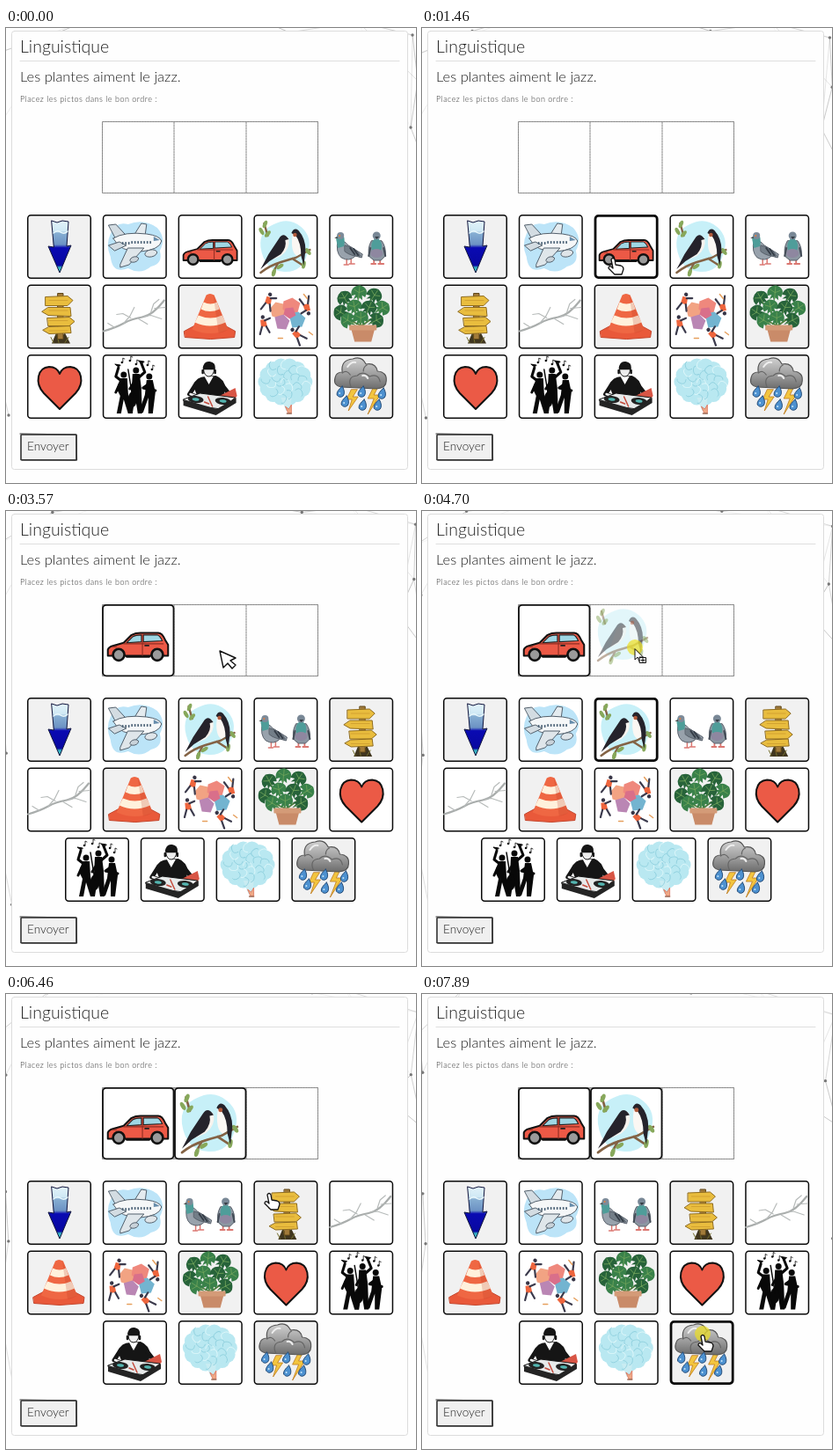
An HTML page with a canvas that plays this animation: 466 px wide and 517 px high, repeating every 8000 ms.

```html
<!DOCTYPE html>
<html lang="fr">
<head>
<meta charset="utf-8">
<title>Linguistique</title>
<style>
html, body { margin: 0; width: 100%; height: 100%; overflow: hidden; background: #fefefe; }
canvas { display: block; width: 466px; height: 517px; }
</style>
</head>
<body>
<canvas id="stage"></canvas>
<script>
const W = 466, H = 517, LOOP = 8000, TILE = 73;
const canvas = document.getElementById('stage');
const ratio = window.devicePixelRatio || 1;
canvas.width = W * ratio;
canvas.height = H * ratio;
const c = canvas.getContext('2d');

// Drawing helpers
function path(d, fill, stroke, width = 1) {
  const p = new Path2D(d);
  if (fill) { c.fillStyle = fill; c.fill(p); }
  if (stroke) { c.strokeStyle = stroke; c.lineWidth = width; c.stroke(p); }
}
function oval(x, y, rx, ry, fill, angle = 0, stroke, width = 1) {
  c.beginPath();
  c.ellipse(x, y, rx, ry, angle, 0, Math.PI * 2);
  if (fill) { c.fillStyle = fill; c.fill(); }
  if (stroke) { c.strokeStyle = stroke; c.lineWidth = width; c.stroke(); }
}
const dot = (x, y, r, fill, stroke, width) => oval(x, y, r, r, fill, 0, stroke, width);
function box(x, y, w, h, r, fill, stroke, width) {
  c.beginPath();
  c.roundRect(x, y, w, h, r);
  if (fill) { c.fillStyle = fill; c.fill(); }
  if (stroke) { c.strokeStyle = stroke; c.lineWidth = width; c.stroke(); }
}
function at(x, y, draw, angle = 0, scale = 1) {
  c.save();
  c.translate(x, y);
  c.rotate(angle);
  c.scale(scale, scale);
  draw();
  c.restore();
}
function label(text, x, y, size, color, spacing = 0) {
  c.font = `300 ${size}px Lato, sans-serif`;
  c.letterSpacing = spacing + 'px';
  c.fillStyle = color;
  c.fillText(text, x, y);
}
function shade(y0, y1, ...stops) {
  const g = c.createLinearGradient(0, y0, 0, y1);
  stops.forEach(([pos, color]) => g.addColorStop(pos, color));
  return g;
}

// Pictograms, each in a 73 x 73 box
function arrow() {
  const blue = shade(7, 66, [0, '#e2f3fa'], [.2, '#cfe8f4'], [.24, '#86aed2'],
    [.46, '#6c92c4'], [.52, '#0a0ab2'], [.86, '#0808a0'], [.9, '#38b6c4'], [1, '#38b6c4']);
  path('M28 7L34 9L40 7L47 8L45 36L50 35L37 66L24 36L30 37Z', blue, '#10143c', 1);
  path('M30 21Q34 17 38 20T46 19', null, '#eaf8fc', 1.5);
}
function plane() {
  path('M9 22Q15 7 29 11Q47 4 62 15Q73 27 65 41Q69 56 55 59Q43 69 29 61Q11 68 9 48Q3 34 9 22', '#bce4f8');
  const ink = '#53606c';
  path('M34 26L44 10L50 11L48 26Z', '#e4ebef', ink);
  path('M7 12L15 11L27 24L17 31Z', '#d3dce2', ink);
  path('M12 27Q25 19 50 22Q65 24 67 30Q65 40 43 42Q20 43 12 27', '#f5f7f8', ink);
  path('M7 35L19 31L27 35L14 41Z', '#d3dce2', ink);
  path('M29 38L47 38L30 57L20 60L20 57Z', '#dfe6ea', ink);
  oval(55, 44, 7, 4, '#dfe5e9', -.2, ink);
  oval(36, 51, 5, 3, '#c9d3da', -.3, ink);
  for (let i = 0; i < 10; i++) box(22 + i * 3.5, 30 + (i < 3 ? 1 : 0), 1.7, 3, .5, '#51677b');
  path('M58 25L65 29L58 30Z', '#668cab');
}
function car() {
  path('M6 51V46Q7 43 11 42L22 39L30 31Q34 29 39 29H57Q61 29 64 36L67 41V52H6Z', '#ec5946', '#111', 1.8);
  path('M25 39L31 33Q34 31 40 31V38Z', '#9fd7e4', '#222');
  path('M42 31H56Q59 32 61 37L42 38Z', '#9fd7e4', '#222');
  path('M41 31V52M22 40H62M11 43H15', null, '#8f2c22', 1);
  box(43, 41, 5, 1.6, .5, '#222');
  for (const x of [17, 56]) dot(x, 51, 5.8, '#9a9a9a', '#111', 2.4);
  path('M25 53H48', null, '#111', 2);
}
function swallows() {
  path('M8 37Q6 18 23 11Q40 2 54 14Q68 26 61 45Q55 66 35 65Q12 64 8 37', '#c7f0f8');
  path('M8 66Q18 58 31 54T48 49L64 40M16 24L12 10M28 55L22 66M44 50L55 57', null, '#846345', 2.4);
  for (const [x, y, a] of [[13, 11, .4], [9, 19, -.5], [16, 22, .7], [23, 66, .3], [30, 59, 1], [57, 57, .2], [62, 42, -.6]])
    oval(x, y, 2.2, 4.5, '#87a85b', a);
  path('M29 30Q38 21 40 28Q42 39 31 47L22 51Z', '#f7f3ee');
  path('M40 28Q34 19 29 27L17 45L8 62L18 53L31 45Q38 37 36 29Z', '#25232b');
  path('M44 25Q44 17 49 17Q54 20 55 29L54 44L49 47Q42 42 44 25', '#fbf7f3');
  path('M43 21Q46 14 51 18Q59 27 59 40L57 58L54 47Q54 32 48 24Z', '#25232b');
  dot(47, 23, 2.2, '#b15a3b');
}
function pigeons() {
  const ink = '#59616b';
  path('M20 49V56M25 49V55M17 57H22M23 56H29', null, '#db7771', 1.5);
  path('M10 29Q16 28 22 35L38 45L37 49L30 47Q23 54 14 49Q7 43 10 29', '#98a2ac', ink);
  path('M18 35Q30 37 36 47Q25 48 18 42Z', '#737e88', ink);
  path('M24 38L29 45M28 39L33 46', null, '#353d47', 2);
  path('M8 28Q9 20 14 21Q19 24 17 36L10 38Z', '#4e9d99');
  dot(13, 24, 4, '#7d8b99');
  dot(12, 24, 1, '#e57e3d');
  path('M9 25L6 27L10 27Z', '#444');
  path('M51 49V55M58 49V55M48 56H53M56 56H62', null, '#db7771', 1.8);
  path('M48 30Q43 39 46 48L51 52H59L64 47Q65 37 60 30Z', '#8c97a2', ink);
  oval(54, 36, 6, 9, '#4f9d9a');
  oval(54, 44, 7, 5, '#8e87a0');
  dot(54, 24, 4.5, '#798896');
  path('M52 25H57L54 28Z', '#363d44');
  path('M47 38L45 47M62 38L64 47', null, '#444c57', 2);
}
function signpost() {
  path('M28 67L33 55L38 60L43 55L49 67Z', '#40361f');
  path('M30 66L27 60M36 66L34 57M43 66L47 60', null, '#76702f');
  path('M35 10H41V62H35Z', '#a27b3a', '#604718');
  const boards = ['M21 14L46 13L52 18L46 24H21Z', 'M24 26H49L50 36L24 35L17 31Z',
    'M23 38L48 37L54 42L48 47H24Z', 'M25 48L49 47L50 55L25 56L18 52Z'];
  boards.forEach((d, i) => {
    path(d, '#e9bd3e', '#8f6c20');
    path(`M25 ${18 + i * 11.5}H46`, null, '#c9972b', .7);
  });
}
function branch() {
  path('M1 53Q15 49 24 44T45 37T70 18', null, '#a9adac', 2.2);
  path('M24 44L31 36L36 26M32 38L23 33L16 34M47 36L55 35L67 39M55 31L58 22L64 17M14 49L6 44M41 39L51 45M59 27L71 26',
    null, '#b7bbba', 1.2);
}
function cone() {
  path('M7 53L20 46H52L65 53L64 60L37 62L8 60Z', '#e9593a', '#c5472e');
  path('M32 12Q36 9 41 12L57 51Q37 60 16 51Z', '#ef6743');
  path('M29 20Q37 24 44 20L47 28Q36 33 26 28Z', '#fff1dc');
  path('M23 35Q37 41 50 35L54 43Q36 51 19 43Z', '#fff1dc');
  path('M40 12L57 51Q51 55 46 55Z', 'rgba(180,50,30,.2)');
}
function person(x, y, angle) {
  at(x, y, () => {
    dot(0, -6, 2.2, '#373546');
    path('M-3 -3H3L4 5H-3Z', '#ee653d');
    path('M2 -2L8 -4M-2 5L-5 13M3 5L6 12', null, '#3b3a4c', 2.2);
  }, angle);
}
function team() {
  path('M19 27L25 20L34 22L38 31L31 39L21 36Z', '#f2a383');
  path('M34 19L44 15L53 21L50 32L39 33L33 28Z', '#ef887d');
  path('M24 37L34 34L41 41L37 51L27 50Z', '#ba86b4');
  path('M40 33L51 31L59 38L55 48L44 49Z', '#73b4d0');
  path('M36 27L45 26L48 35L41 39L34 34Z', '#d96f8a');
  person(17, 17, .3);
  person(11, 43, -.1);
  person(61, 27, 2.9);
  person(48, 56, -.7);
  path('M57 11L61 16M28 61L33 61M63 54L67 57', null, '#e6a05e', 1.5);
}
function plant() {
  path('M37 50Q35 35 24 25M37 49L47 19M37 47L58 32M37 47L14 36', null, '#517d3a', 1.6);
  const leaves = [[18, 16, -.5], [34, 10, .1], [51, 13, .6], [60, 27, 1], [14, 32, -1], [29, 26, -.2], [45, 27, .4], [22, 41, -1], [53, 41, 1.1], [36, 39, 0]];
  leaves.forEach(([x, y, a], i) => at(x, y, () => {
    path('M0 -10Q13 -7 8 4L4 2L5 8L1 5L0 11L-2 5L-6 8L-4 2L-9 4Q-12 -7 0 -10', i % 2 ? '#39814a' : '#27633a');
    path('M0 -8V8M0 -1L6 -4M0 -1L-6 -4', null, '#74a65c', .8);
  }, a, .92));
  path('M25 50H52L48 65H29Z', '#c98b69');
  box(23, 46, 31, 6, 1, '#d49b78');
}
function heart() {
  path('M37 62Q28 53 19 44C8 32 12 15 25 14Q34 14 37 22Q40 14 49 14C62 15 66 32 55 44Q46 53 37 62Z', '#eb5a46', '#111', 2);
}
function band() {
  const black = '#080808';
  for (const [x, y] of [[24, 23], [38, 18], [53, 25]]) dot(x, y, 3.5, black);
  path('M20 27L28 27L29 44L34 67H29L24 51L21 67H16L20 47L16 39Z', black);
  path('M34 22H42L44 38L45 67H40L37 48L34 67H29L33 41Z', black);
  path('M50 29H57L60 43L57 67H52L52 49L46 66H41L48 46Z', black);
  path('M24 32L15 25L18 15M40 27L48 20L44 10M53 33L46 38L60 41M19 34L15 43M36 31L31 39', null, black, 3);
  oval(34, 51, 5, 9, black);
  path('M34 48L29 17', null, black, 1.5);
  path('M18 14L14 11L20 12ZM44 11L41 7L47 8Z', black, black, 1);
  for (const [x, y] of [[22, 9], [31, 7], [38, 11], [51, 12], [56, 17]]) {
    dot(x, y, 1.2, black);
    path(`M${x + 1} ${y}V${y - 5}l2 1`, null, black, .8);
  }
}
function dj() {
  const ink = '#151515';
  path('M17 35Q21 25 31 25L43 24Q53 28 54 39L50 53H24Z', ink);
  path('M30 25L35 34L40 25Z', '#fff');
  oval(35, 17, 6, 8, '#eee', 0, ink);
  path('M28 16Q29 7 36 8Q43 9 42 16Z', ink);
  path('M30 16H41M28 18V21M42 18V21', null, ink, 2.5);
  path('M20 34L13 45L28 50M51 36L58 45L45 49', null, ink, 5);
  path('M14 45L29 50M57 46L44 50', null, '#f0f0f0', 2.6);
  path('M47 47L65 38L67 47L62 54Z', '#d85545');
  path('M6 51L25 44L65 49L49 62L9 57Z', '#e7eaea', ink);
  path('M6 51V58L43 69L66 55V49L44 62Z', '#242424');
  oval(20, 51, 9, 4, '#222', .1);
  oval(51, 53, 9, 4, '#222', .1);
  oval(20, 51, 4, 1.7, '#53b5b0', .1);
  oval(51, 53, 4, 1.7, '#53b5b0', .1);
  path('M34 48L39 59M30 54L35 56', null, '#c44a3b', 1.5);
}
function cloud() {
  for (let i = 0; i < 14; i++) {
    const a = i * Math.PI / 7;
    dot(36 + Math.cos(a) * 22, 31 + Math.sin(a) * 18, 9, '#b9e8f1');
  }
  oval(36, 31, 24, 21, '#b9e8f1');
  path('M31 49L43 49L42 61L37 64Z', '#c9ecf2');
  for (let i = 0; i < 22; i++) {
    const a = i * 2.4, r = Math.sqrt(i) * 4.7;
    at(36 + Math.cos(a) * r * 1.15, 30 + Math.sin(a) * r, () =>
      path('M-5 2Q-4 -4 1 -2T5 3', null, i % 3 ? '#91d1df' : '#dff7fa', .9), a);
  }
  path('M39 66L36 59L40 62L43 57L43 66Z', '#eeaa87', '#d9664f', .7);
  path('M38 67H43', null, '#9b6550', 1.5);
}
function storm() {
  const gray = shade(3, 40, [0, '#d3d3d3'], [.55, '#9c9c9c'], [1, '#696969']);
  path('M25 40L20 51H26L22 64L33 48H27L32 40ZM50 38L44 50H51L44 68L58 46H51L55 38Z', '#f3c53f', '#bd791c', .8);
  path('M14 37Q4 35 7 26Q8 20 15 20Q13 6 27 5Q37 1 42 11Q53 9 55 19Q66 20 65 30Q65 38 54 39Z', gray, '#555', 1.2);
  path('M15 21Q20 17 24 23M43 12Q39 14 39 19M25 37Q20 25 32 24Q38 18 46 25Q56 21 58 31', null, '#656565', 1.2);
  path('M21 14Q25 8 30 9M38 24Q42 23 44 27', null, '#eee', 2);
  for (const [x, y] of [[13, 42], [18, 53], [37, 42], [38, 57], [60, 44], [55, 57]])
    at(x, y, () => {
      path('M2 -6Q6 1 3 5Q-1 8 -4 4Q-5 0 2 -6', '#4d91d0', '#254c78', 1);
      dot(-1, 2, 1, '#c9e8fa');
    });
}

const GRAY = new Set([arrow, signpost, cone, plant, storm]);
const PICTOS = [arrow, plane, car, swallows, pigeons, signpost, branch, cone,
  team, plant, heart, band, dj, cloud, storm];

// Timeline
const DROPS = [{ picto: car, time: 3050 }, { picto: swallows, time: 5060 }];
const DRAGS = [
  { picto: car, from: 1750, to: 3050, x: 196, y: 212, grab: [217, 262], alpha: .65 },
  { picto: swallows, from: 4250, to: 5060, x: 196, y: 212, grab: [246, 265], alpha: .5 }
];
const HOVERS = [[car, 1150, 3050], [swallows, 4020, 5060], [storm, 6850, LOOP]];
const PRESSES = [[1750, 3050], [4200, 5060], [7720, LOOP]];
const HANDS = [[1150, 3050], [4000, 4330], [6300, LOOP]];
const MOVES = [[130, 450, 487], [390, 330, 487], [640, 262, 402], [1000, 225, 300],
  [1250, 217, 262], [1750, 217, 262], [2600, 138, 158], [3100, 138, 158],
  [3500, 243, 159], [3700, 243, 159], [4080, 246, 265], [4250, 246, 265],
  [4650, 242, 157], [5900, 242, 157], [6460, 299, 227], [6720, 314, 362],
  [6900, 319, 388], [LOOP, 319, 388]];
const during = (t, list) => list.some(([a, b]) => t >= a && t < b);

function pointer(t) {
  const i = Math.max(1, MOVES.findIndex(m => m[0] > t));
  const [t0, x0, y0] = MOVES[i - 1], [t1, x1, y1] = MOVES[i];
  const u = Math.max(0, (t - t0) / (t1 - t0)), e = u * u * (3 - 2 * u);
  return [x0 + (x1 - x0) * e, y0 + (y1 - y0) * e];
}

// Drifting background network: x, y, speed x, speed y (px/s)
const NODES = [[3, 440, 1.03, 2.05], [460, 113, -4, 1], [468, 60, -1.2, 4.9], [462, 8, 1, 2],
  [480, 165, -1, -2], [473, 262, -.8, 2], [484, 345, -1.4, 1], [-8, 28, .6, 2],
  [-4, 105, .6, -2], [-7, 215, 1, 1.5], [-3, 268, .9, 2], [-14, 365, 1, -1],
  [290, -9, 2, 1], [322, 5, 4, -1], [400, -7, -2, .5], [100, -12, 4, 1], [60, 5, -2, -1]];

function network(t) {
  const pts = NODES.map(([x, y, vx, vy]) => [x + vx * t / 1000, y + vy * t / 1000]);
  pts.forEach(([x, y], i) => {
    for (const [x2, y2] of pts.slice(i + 1)) {
      const d = Math.hypot(x2 - x, y2 - y);
      if (d < 150) path(`M${x} ${y}L${x2} ${y2}`, null, `rgba(110,110,110,${.7 * (1 - d / 150)})`, .8);
    }
    dot(x, y, 1.7, '#777');
  });
}

function page() {
  box(6.5, 3.5, 450, 498, 3, '#fefefe', '#dcdcdc', 1);
  label('Linguistique', 16, 28, 19.5, '#222');
  path('M16 37.5H447', null, '#dedede');
  label('Les plantes aiment le jazz.', 16, 61, 16.5, '#222');
  label('Placez les pictos dans le bon ordre :', 16, 84, 9, '#333', .5);
  box(17, 462, 63, 29, 1, '#f0f0f0', '#333', 1.6);
  path('M16 461L80 462L80.5 491L17 490.5', null, '#333', 1.2);
  label('Envoyer', 24, 480, 13.6, '#222');
}

function slots(t) {
  c.setLineDash([2, 1]);
  path('M109.5 106.5H354.5V187.5H109.5ZM191 107V187M273 107V187', null, '#858585');
  c.setLineDash([]);
  DROPS.forEach(({ picto, time }, i) => {
    if (t < time) return;
    const x = 109 + i * 82;
    box(x + 1, 106.8, 80.5, 80.5, 4, '#fff', '#111', 1.8);
    at(x, 106, picto, 0, 82 / TILE);
  });
}

function tiles(t) {
  const placed = DROPS.filter(d => t >= d.time).map(d => d.picto);
  const rest = PICTOS.filter(p => !placed.includes(p));
  rest.forEach((picto, i) => {
    const row = Math.floor(i / 5), count = Math.min(5, rest.length - row * 5);
    const x = 24 + (5 - count) * 43 + i % 5 * 85.8, y = 212 + row * 79.5;
    const hover = HOVERS.some(([p, a, b]) => p === picto && t >= a && t < b);
    const w = hover ? 2.8 : 1.5;
    box(x + w / 2, y + w / 2, TILE - w, TILE - w, 3.5, GRAY.has(picto) ? '#f1f1f1' : '#fff', '#0a0a0a', w);
    at(x, y, picto);
  });
}

function cursor(t) {
  if (t < 130) return;
  const [x, y] = pointer(t);
  const drag = DRAGS.find(d => t >= d.from && t < d.to);
  if (drag) {
    c.globalAlpha = drag.alpha;
    at(drag.x + x - drag.grab[0], drag.y + y - drag.grab[1], drag.picto);
    c.globalAlpha = 1;
  }
  if (during(t, PRESSES)) dot(x, y - 2, 9, 'rgba(236,222,32,.7)');
  at(x, y, () => {
    if (during(t, HANDS)) {
      path('M-2 1Q0 -2 2 1L3 7L9 8Q12 9 12 12L10 18H2L-5 11Q-5 8 -2 9L0 11Z', '#fff', '#111', 1.3);
    } else if (drag) {
      path('M0 0V12L3 9L5 14L7 13L5 9H9Z', '#fff', '#111');
      box(5.5, 9.5, 7, 6, 0, '#fff', '#111', 1);
      path('M7 12.5H11M9 10.5V14.5', null, '#111');
    } else {
      path('M0 0L4 19L9 14L14 20L18 16L12 11L18 8Z', '#fff', '#111', 1.4);
    }
  });
}

function frame(now) {
  const t = now % LOOP;
  c.setTransform(ratio, 0, 0, ratio, 0, 0);
  c.lineJoin = c.lineCap = 'round';
  c.fillStyle = '#fefefe';
  c.fillRect(0, 0, W, H);
  network(t);
  page();
  slots(t);
  tiles(t);
  cursor(t);
  requestAnimationFrame(tick);
}
const start = performance.now();
function tick() { frame(performance.now() - start); }
tick();
</script>
</body>
</html>
```
